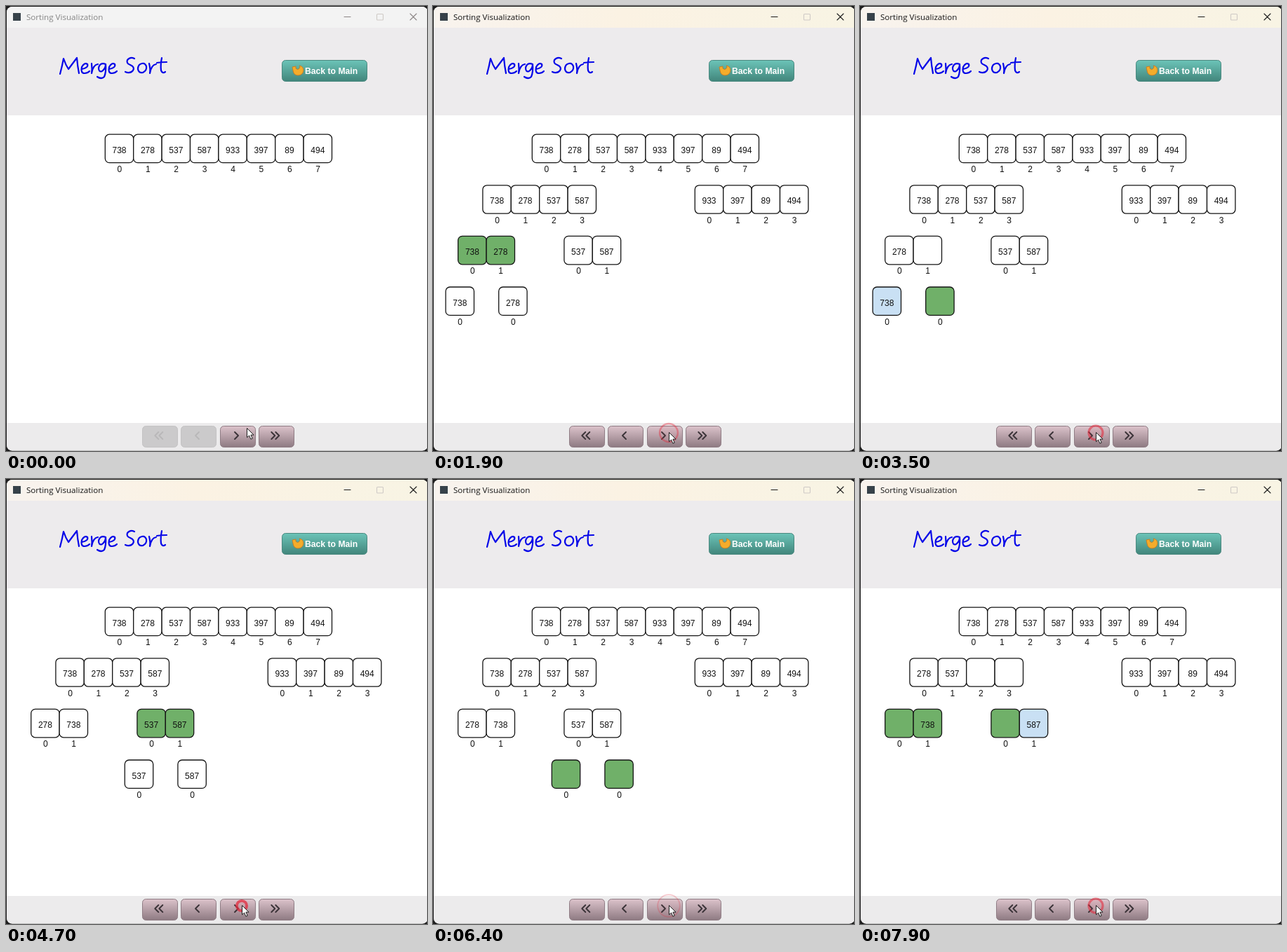
These frames come from a looping animation (600x635 px, 8 s). An HTML page:

```html
<!DOCTYPE html>
<html lang="en">
<head>
<meta charset="utf-8">
<title>Sorting Visualization</title>
<style>
  html, body { margin: 0; width: 100%; height: 100%; overflow: hidden; background: #1d1d1d; }
  svg { display: block; width: 100vw; height: 100vh; }
  .cells text { font: 12px "Liberation Sans", Arial, sans-serif; fill: #111; text-anchor: middle; }
  .cells rect { stroke: #141414; stroke-width: 1.3; }
  .caption { font: 11.6px "Open Sans", sans-serif; }
  .back { font: bold 12.2px "Liberation Sans", Arial, sans-serif; fill: #fff; }
  .line { fill: none; stroke-linecap: round; stroke-linejoin: round; }
</style>
</head>
<body>
<svg viewBox="0 0 600 635">
  <defs>
    <linearGradient id="cream"><stop offset="0" stop-color="#f8f3ee"/><stop offset=".45" stop-color="#fbf2e3"/><stop offset="1" stop-color="#f8f4e4"/></linearGradient>
    <linearGradient id="teal" x2="0" y2="1"><stop offset="0" stop-color="#6cc4b8"/><stop offset="1" stop-color="#41857b"/></linearGradient>
    <linearGradient id="mauve" x2="0" y2="1"><stop offset="0" stop-color="#dcc3cb"/><stop offset="1" stop-color="#8e7a82"/></linearGradient>
    <clipPath id="frame"><rect x="1" y="1" width="600" height="633.5" rx="8"/></clipPath>
  </defs>
  <g clip-path="url(#frame)">
    <rect width="600" height="635" fill="#fff"/>
    <rect id="bar" width="600" height="31"/>
    <rect y="31" width="600" height="125" fill="#edebed"/>
    <rect y="595" width="600" height="40" fill="#ecebec"/>
  </g>
  <rect x="10" y="10" width="11" height="11" fill="#37424a"/>
  <text id="caption" class="caption" x="29" y="20">Sorting Visualization</text>
  <g id="controls" class="line" stroke-width="1.1">
    <path d="M482 15.5h9M576 11l9 9m0-9l-9 9"/>
    <rect x="528.5" y="11.5" width="9" height="8.5" rx="1" stroke="#cfcac6"/>
  </g>
  <g class="line" stroke="#0606e8" stroke-width="2.2" role="img" aria-label="Merge Sort">
    <path d="M77 97Q80 86 82 75Q85 84 89 90Q95 82 101 74Q102 86 104 96"/>
    <path d="M108 90Q118 88 116 83Q112 80 108 87Q106 96 112 96Q116 96 119 93"/>
    <path d="M122 82Q123 90 122 96Q124 84 131 83"/>
    <path d="M142 83Q134 80 132 88Q132 95 137 93Q142 89 142 83Q143 94 140 101Q136 105 130 101"/>
    <path d="M147 90Q157 88 155 83Q151 80 147 87Q145 96 151 96Q155 96 158 93"/>
    <path d="M183 75Q177 72 173 77Q171 82 177 84Q184 87 181 92Q177 97 170 94"/>
    <path d="M194 82Q188 83 188 90Q189 96 195 95Q201 92 200 86Q198 81 194 82"/>
    <path d="M204 82Q206 90 205 96Q207 84 214 83"/>
    <path d="M222 74Q220 84 221 92Q223 97 227 94M215 81Q222 80 229 80"/>
  </g>
  <rect x="393.5" y="77.5" width="121" height="30" rx="5" fill="url(#teal)" stroke="#4b8980"/>
  <path d="M408 87l5 -1l0 3q3 3 5 0q2-2 0-4q6 1 6 7q-1 7-8 7q-6 0-7-7z" fill="#f4ac2b" stroke="#c9751b" stroke-width=".8"/>
  <text class="back" x="426" y="97">Back to Main</text>
  <g id="cells" class="cells"></g>
  <g id="nav"></g>
  <g id="rings" fill="#e8394a" fill-opacity=".12" stroke="#e3293c"></g>
  <path id="cursor" d="M0 0V13.2L3.1 10.4L5.4 15.6L7.7 14.6L5.4 9.6H9.6Z" fill="#fff" stroke="#222" stroke-width="1" stroke-linejoin="round"/>
</svg>
<script>
const LOOP = 8000, TICK = 100, DELAY = 200, RING_LIFE = 500;
const PITCH = 40.4, GREEN = '#70b069', BLUE = '#c9e0f4', WHITE = '#fff';
const clicks = [500, 1200, 1600, 2000, 2300, 2700, 3300, 3600, 3900, 4200,
                4600, 4900, 5300, 5600, 6000, 6500, 6900, 7300, 7700];
const $ = id => document.getElementById(id);

const makeNode = (values, mid, row) => ({ mid, row, cells: values.map(v => ({ v, fill: WHITE })), kids: [] });
const paint = (node, fill) => node.cells.forEach(c => c.fill = fill);

function drawNode({ mid, row, cells, kids }) {
  const left = mid - cells.length * PITCH / 2, top = 183.2 + row * 72.6;
  const own = cells.map((c, i) => {
    const x = left + i * PITCH, cx = x + PITCH / 2;
    return `<rect x="${x}" y="${top}" width="${PITCH}" height="40.4" rx="6" fill="${c.fill}"/>` +
      `<text x="${cx}" y="${top + 26.5}">${c.v ?? ''}</text><text x="${cx + .4}" y="${top + 54}">${i}</text>`;
  });
  return own.join('') + kids.map(drawNode).join('');
}

// Yields after each user step of the merge sort.
function* mergeSort(node) {
  paint(node, GREEN);
  const values = node.cells.map(c => c.v), half = values.length / 2;
  if (values.length === 1) { yield; paint(node, WHITE); return; }
  const shift = 151.2 / 2 ** node.row;
  node.kids = [makeNode(values.slice(0, half), node.mid - shift, node.row + 1),
               makeNode(values.slice(half), node.mid + shift, node.row + 1)];
  yield;
  paint(node, WHITE);
  for (const kid of node.kids) yield* mergeSort(kid);

  node.cells.forEach(c => c.v = null);
  node.kids.forEach(kid => paint(kid, GREEN));
  const pool = node.kids.flatMap(kid => kid.cells).sort((a, b) => a.v - b.v);
  for (const [i, next] of pool.entries()) {
    next.fill = BLUE;
    yield;
    node.cells[i].v = next.v;
    next.v = null;
    next.fill = GREEN;
  }
  yield;
  node.kids = [];
  yield;
}

const root = makeNode([738, 278, 537, 587, 933, 397, 89, 494], 302.9, 0);
const steps = [drawNode(root)], run = mergeSort(root);
while (steps.length <= clicks.length && !run.next().done) steps.push(drawNode(root));

function navButton(x, dir, marks, on) {
  const tips = marks === 2 ? [-2.7, 3.3] : [0];
  const d = tips.map(o => `M${x + 23 + o - dir * 2.5} 608l${dir * 5} 5l${-dir * 5} 5`).join('');
  return `<rect x="${x}" y="599.5" width="50" height="30" rx="5" fill="${on ? 'url(#mauve)' : '#cbcacb'}" stroke="${on ? '#8f7c84' : '#c3c2c3'}"/>` +
    `<path class="line" d="${d}" stroke="${on ? '#3b3338' : '#b9b8b9'}" stroke-width="1.9"/>`;
}

function draw(t) {
  const active = t >= clicks[0];
  const step = clicks.filter(c => t >= c + DELAY).length;
  $('bar').setAttribute('fill', active ? 'url(#cream)' : '#f3f3f3');
  $('caption').setAttribute('fill', active ? '#161616' : '#858585');
  $('controls').setAttribute('stroke', active ? '#1a1a1a' : '#8b8585');
  $('cells').innerHTML = steps[step];
  $('nav').innerHTML = navButton(194.5, -1, 2, step > 0) + navButton(249.5, -1, 1, step > 0) +
    navButton(305.5, 1, 1, true) + navButton(360.5, 1, 2, true);
  $('rings').innerHTML = clicks.filter(c => t >= c && t < c + RING_LIFE).map(c => {
    const k = (t - c) / TICK;
    return `<circle cx="336" cy="609" r="${4.2 + 2.9 * k}" stroke-width="${4.6 - .7 * k}" opacity="${.92 - .17 * k}"/>`;
  }).join('');
  const p = Math.min(t / 300, 1);
  $('cursor').setAttribute('transform', `translate(${343.5 - 7 * p} ${602.5 + 6 * p})`);
}

let start, last = -1;
function frame(now) {
  start ??= now;
  const t = Math.floor((now - start) % LOOP / TICK) * TICK;
  if (t !== last) draw(last = t);
  requestAnimationFrame(frame);
}
draw(0);
requestAnimationFrame(frame);
</script>
</body>
</html>
```
